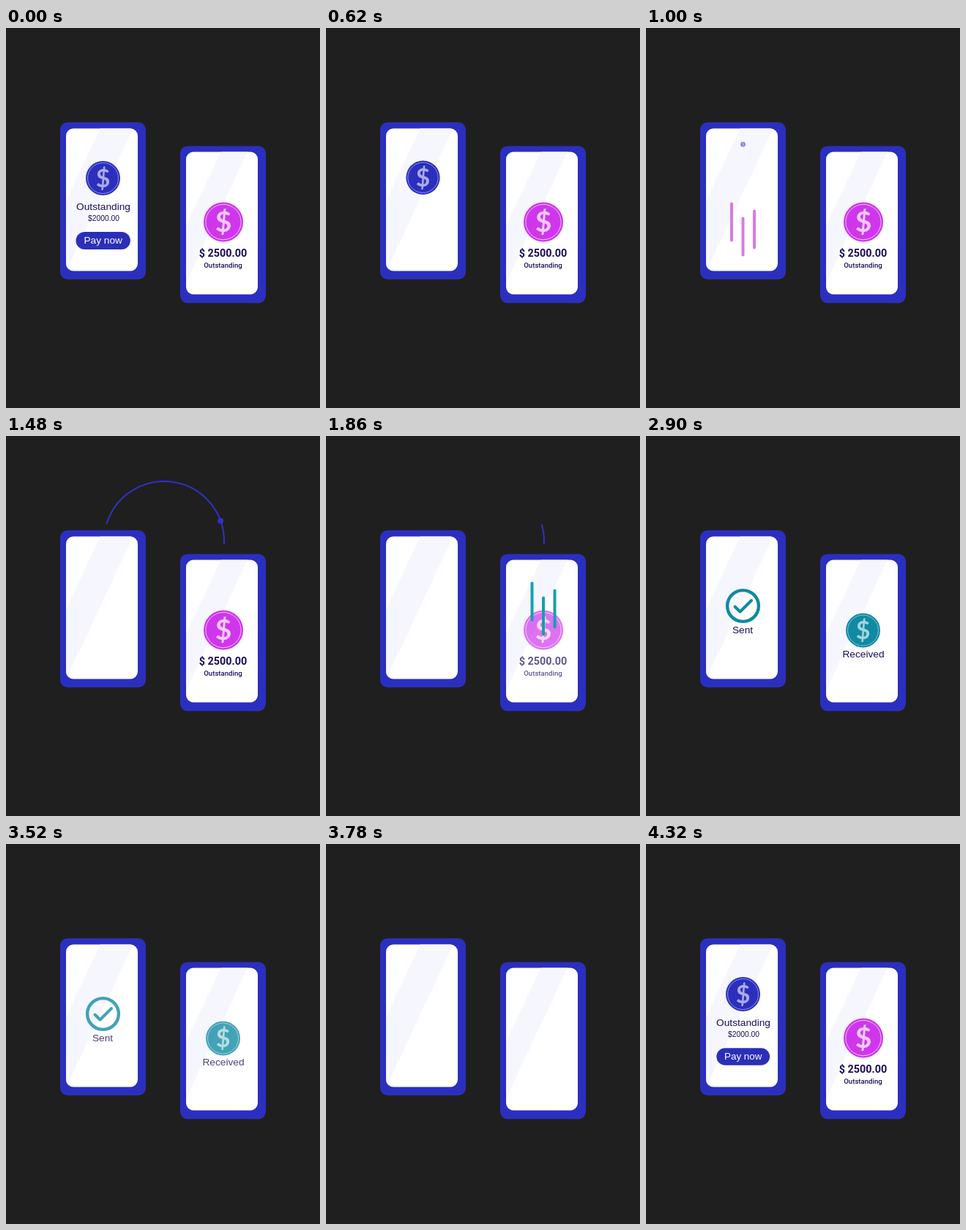
Write an HTML page that moves like this. It is 429 px wide and 520 px high and loops after 4340 ms.

```html
<!DOCTYPE html>
<html lang="en">
<head>
<meta charset="utf-8">
<title>Payment between two phones</title>
<style>
  html, body { margin: 0; width: 100%; height: 100%; overflow: hidden; background: #1f1f1f; }
  svg { display: block; width: 100%; height: 100%; }
  text { text-anchor: middle; fill: #1c0d5c; font-family: "Liberation Sans", Arial, sans-serif; font-size: 13.7px; }
  .roboto { font-family: Roboto, sans-serif; }
  .sign { font: 700 34px Lato, sans-serif; }
  .streaks { stroke-width: 4; stroke-linecap: round; }
  .arc { fill: none; stroke: #3032c4; stroke-width: 2; }
</style>
</head>
<body>
<svg viewBox="0 0 429 520">
  <defs>
    <clipPath id="leftScreen"><rect x="82" y="137.5" width="98" height="195" rx="10"/></clipPath>
    <clipPath id="rightScreen"><rect x="246" y="169.5" width="98" height="195" rx="10"/></clipPath>
    <path id="streak" d="M-15.5 -18V32M0 2V52M15.5 -8V42"/>
  </defs>

  <rect width="429" height="520" fill="#1f1f1f"/>

  <path id="topArc" class="arc"/>
  <path id="bottomArc" class="arc" stroke-dasharray="12 8"/>
  <circle id="topDot" r="4" fill="#3032c4"/>
  <circle id="bottomDot" r="4" fill="#3032c4"/>

  <rect x="74" y="129" width="117" height="215" rx="10" fill="#2b2fc0"/>
  <rect x="238" y="161.5" width="117" height="215" rx="10" fill="#2b2fc0"/>

  <g clip-path="url(#leftScreen)">
    <rect x="82" y="137" width="98" height="196" fill="#fff"/>
    <path d="M129 137H174L82 333V237Z" fill="#f6f6fe"/>
    <g id="pinkStreaks" class="streaks" stroke="#d04be2"><use href="#streak"/></g>
  </g>
  <g clip-path="url(#rightScreen)">
    <rect x="246" y="169" width="98" height="196" fill="#fff"/>
    <path d="M294 169H330L246 348V270Z" fill="#f6f6fe"/>
  </g>

  <g id="blueCoin"></g>
  <g id="bill">
    <text x="133" y="248.5">Outstanding</text>
    <text x="133.5" y="264" font-size="10.3" style="font-size:10.3px">$2000.00</text>
    <g id="button">
      <rect x="-37.2" y="-12" width="74.4" height="24" rx="12" fill="#2b2fb8"/>
      <text y="4" style="fill:#fff">Pay now</text>
    </g>
  </g>

  <g id="sent">
    <g id="badge" fill="none" stroke="#0f8aa2" stroke-width="4">
      <circle r="21.4" stroke-width="4.4"/>
      <path id="tick" d="M-11 1L-4 8L11.5 -7.5" pathLength="1" stroke-dasharray="1 2" stroke-linecap="round" stroke-linejoin="round"/>
    </g>
    <text id="sentLabel" x="132" y="270">Sent</text>
  </g>

  <g id="due">
    <g id="pinkCoin"></g>
    <text class="roboto" x="296.5" y="313" style="font-size:14.4px;font-weight:700">$ 2500.00</text>
    <text class="roboto" x="296.5" y="327.5" style="font-size:9.6px;font-weight:500">Outstanding</text>
  </g>

  <g id="received">
    <g id="tealCoin"></g>
    <text x="297" y="303">Received</text>
  </g>
  <g clip-path="url(#rightScreen)">
    <g id="tealStreaks" class="streaks" stroke="#12a0b2"><use href="#streak"/></g>
  </g>
</svg>

<script>
const LOOP = 4340;
const el = id => document.getElementById(id);
const set = (id, name, value) => el(id).setAttribute(name, value);
const fade = (id, value) => set(id, "opacity", value);
const place = (id, x, y, scale = 1) =>
  set(id, "transform", `translate(${x} ${y}) scale(${scale})`);

const ramp = (t, from, to) => Math.min(1, Math.max(0, (t - from) / (to - from)));
const ease = u => u < .5 ? 2 * u * u : 1 - 2 * (1 - u) ** 2;
const eased = (t, from, to) => ease(ramp(t, from, to));
const mix = (a, b, p) => a + (b - a) * p;

function makeCoin(id, x, y, scale, fill, light) {
  el(id).innerHTML =
    `<circle r="23.5" fill="${fill}"/>
     <circle r="21" fill="none" stroke="${light}" stroke-width=".8"/>
     <text class="sign" y="12" style="fill:${light}">$</text>`;
  place(id, x, y, scale);
}

// Circular route; angles in degrees, clockwise from the right.
const RADIUS = 82;
function point(route, p) {
  const a = mix(route.from, route.to, p) * Math.PI / 180;
  return [216 + RADIUS * Math.cos(a), route.cy + RADIUS * Math.sin(a)];
}

function drawRoute(route, t) {
  const head = eased(t, ...route.draw);
  const tail = eased(t, ...route.erase);
  const travel = ramp(t, ...route.move);
  const sweep = route.to - route.from;
  const large = (head - tail) * sweep > 180 ? 1 : 0;
  set(route.line, "d", head > tail
    ? `M${point(route, tail)}A${RADIUS} ${RADIUS} 0 ${large} 1 ${point(route, head)}` : "");
  if (route.dashed)
    set(route.line, "stroke-dashoffset", tail * sweep * Math.PI / 180 * RADIUS);
  place(route.dot, ...point(route, ease(travel)));
  fade(route.dot, travel > 0 && travel < 1 ? 1 : 0);
}

const routes = [
  { line: "topArc", dot: "topDot", cy: 144, from: 197, to: 363,
    draw: [1050, 1300], move: [1090, 1620], erase: [1600, 1944] },
  { line: "bottomArc", dot: "bottomDot", cy: 372, from: 10, to: 193, dashed: true,
    draw: [1940, 2190], move: [1976, 2516], erase: [2410, 2740] }
];

makeCoin("blueCoin", 132.5, 205.5, 1, "#2b2fbe", "#a9abea");
makeCoin("pinkCoin", 297, 265.5, 1.15, "#cf36ec", "#f3cbfb");
makeCoin("tealCoin", 296.5, 266, 1, "#0f8aa2", "#a3d3dc");

function draw(t) {
  const enter = ramp(t, 3800, 4000);

  // Bill on the left phone
  fade("bill", t < 2000 ? 1 - ramp(t, 260, 540) : enter);
  const press = t > 2000 ? ramp(t, 4040, 4360) : 0;
  place("button", 132.7, 291, 1 - .06 * Math.sin(Math.PI * press));
  const lift = t < 2000 ? eased(t, 580, 1040) : 0;
  place("blueCoin", 132.5, mix(205.5, 158.5, lift), mix(1, .13, lift));
  fade("blueCoin", t < 2000 ? 1 - ramp(t, 960, 1060) : enter);

  // Streaks leave one phone and arrive in the other
  place("pinkStreaks", 132.5, 259 - (t - 1000) * .39);
  fade("pinkStreaks", ramp(t, 780, 840) * (1 - ramp(t, 940, 1180)));
  place("tealStreaks", 297, 219 + (t - 1860) * .39);
  fade("tealStreaks", ramp(t, 1630, 1690) * (1 - ramp(t, 1870, 2040)));

  routes.forEach(route => drawRoute(route, t));

  // Right phone
  fade("due", t < 3000 ? 1 - ramp(t, 1800, 2000) : enter);
  fade("received", ramp(t, 1940, 2120) * (1 - ramp(t, 3460, 3740)));

  // Confirmation on the left phone
  fade("sent", 1 - ramp(t, 3460, 3740));
  fade("badge", ramp(t, 2440, 2560));
  place("badge", 132.5, 232.5, mix(.5, 1, eased(t, 2440, 2680)));
  const tick = eased(t, 2540, 2760);
  set("tick", "stroke-dashoffset", 1 - tick);
  fade("tick", tick > 0 ? 1 : 0);
  fade("sentLabel", ramp(t, 2560, 2760));
}

function frame(now) {
  draw(now % LOOP);
  requestAnimationFrame(frame);
}
draw(0);
requestAnimationFrame(frame);
</script>
</body>
</html>
```
